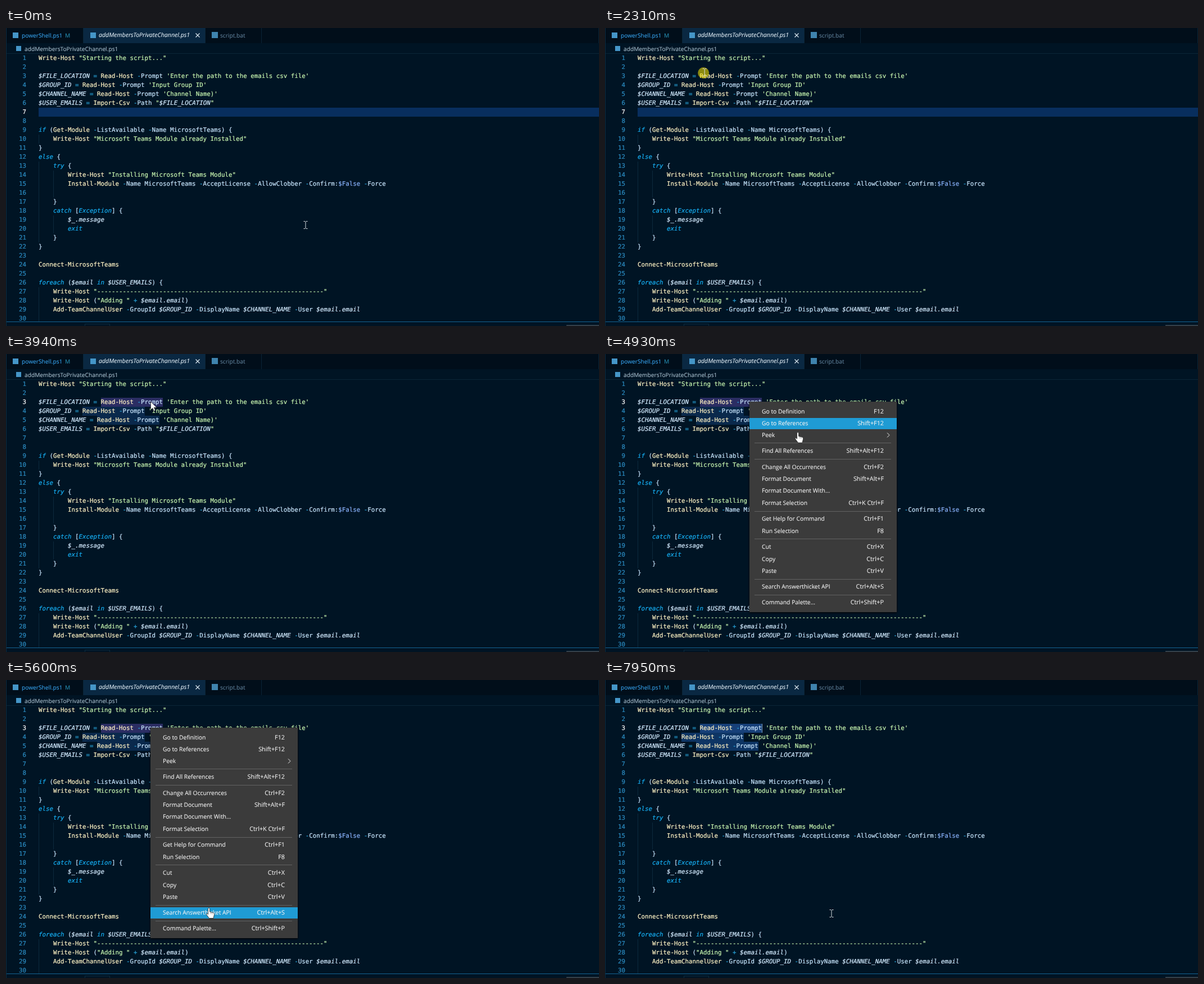
Recreate the animation shown at these times as an HTML page. Size 1055 px wide and 531 px high, loop 8 s.

```html
<!DOCTYPE html>
<html lang="en">
<head>
<meta charset="utf-8">
<title>Script editor</title>
<style>
html, body { margin: 0; width: 100%; height: 100%; overflow: hidden; background: #001424; }
#stage { position: absolute; left: 0; top: 0; width: 1055px; height: 531px; overflow: hidden;
  background: #001424; font: 10.2px/16px "Open Sans", sans-serif; text-rendering: geometricPrecision;
  -webkit-text-stroke: .12px; }
#stage div, #stage svg { position: absolute; white-space: pre; }
.tab { top: 0; height: 27px; background: #010e1a; border-right: 1px solid #0a2436; box-sizing: border-box; }
.icon { background: #4596c8; }
#editor { left: 0; top: 46px; width: 1055px; height: 477px; overflow: hidden;
  font: 10.8px/16px "DejaVu Sans Mono", monospace; color: #c8e5fc; -webkit-text-stroke: .22px; }
#marks, #text, #halo { left: 0; top: 0; }
.num { left: 0; width: 36px; height: 16px; text-align: right; color: #2b8cc2; }
.num.on { color: #fff; }
.code { left: 58px; height: 16px; }
.str { color: #c8f5b0; } .cmd { color: #fff2c4; } .op { color: #28a4da; }
.var { color: #d4ebff; font-style: italic; } .key { color: #16aef2; font-style: italic; }
.const { color: #86aef5; }
.guide { width: 1px; background: #0c2a3d; }
#activeRow { left: 58px; top: 96px; width: 997px; height: 16px; background: #082e5e; }
.mark { height: 16px; background: #0e3564; }
.mark.sel { background: #174079; }
.blur .mark { background: #0a294c; }
.blur .mark.sel { background: #2b2d63; }
#caret { top: 32px; width: 1px; height: 16px; background: #80a4c2; }
#menu { left: 257px; top: 85px; width: 262px; height: 375px; background: #3b3b3b;
  box-shadow: 0 1px 3px #000; color: #f2f2f2; font-size: 10.35px; }
#menu .keys { right: 23px; font-size: 10.8px; }
#menu .sep { left: 9px; width: 243px; height: 1px; background: #626262; }
#hover { left: 0; width: 262px; height: 20px; background: #1f9bd4; }
#halo { width: 20px; height: 20px; border-radius: 50%; background: rgba(255, 235, 0, .55); }
#stage svg { overflow: visible; left: 0; top: 0; width: 1px; height: 1px; }
</style>
</head>
<body>
<div id="stage">
  <div class="tab" style="left:0;width:1055px"></div>
  <div class="tab" style="left:0;width:138px"></div>
  <div class="tab" style="left:138px;width:217px;background:#0a2842"></div>
  <div class="tab" style="left:355px;width:100px"></div>
  <div class="icon" style="left:12px;top:8px;width:10px;height:10px"></div>
  <div style="left:28px;top:5px;color:#36a0ea">powerShell.ps1</div>
  <div style="left:105px;top:5px;color:#268cb0">M</div>
  <div class="icon" style="left:150px;top:8px;width:10px;height:10px"></div>
  <div style="left:165px;top:5px;color:#e3eef6;font-size:10.6px;font-style:italic">addMembersToPrivateChannel.ps1</div>
  <svg><path d="M337.500 9.500l7 7m0-7l-7 7" stroke="#dce8f0" stroke-width="1.200"/></svg>
  <div class="icon" style="left:366px;top:7px;width:11px;height:11px;background:#3f83ad"></div>
  <div style="left:381px;top:5px;color:#5f7e97">script.bat</div>
  <div class="icon" style="left:18px;top:32px;width:9px;height:9px"></div>
  <div style="left:33px;top:29px;color:#a9bfcd">addMembersToPrivateChannel.ps1</div>
  <div style="left:0;top:45px;width:1055px;height:1px;background:#0a2537"></div>

  <div id="editor">
    <div id="activeRow"></div>
    <div id="marks"></div>
    <div id="text"></div>
    <div id="caret"></div>
  </div>

  <div style="left:0;top:523px;width:1055px;height:1px;background:#146393"></div>
  <div style="left:140px;top:527px;width:43px;height:4px;border:1px solid #0d2a3d;border-bottom:0"></div>
  <div style="left:997px;top:529px;width:58px;height:2px;background:#34404a"></div>
  <div style="left:0;top:0;width:1px;height:531px;background:#0d2c40"></div>

  <div id="menu"><div id="hover"></div></div>
  <div id="halo"></div>
  <svg id="beam"><path d="M-3.500-6.500h2.500l1 1 1-1h2.500M0-5.500v11M-3.500 6.500h2.500l1-1 1 1h2.500" fill="none" stroke="#d8dde0"/></svg>
  <svg id="arrow"><path d="M.5 0v14.500l3.400-3.200 2.300 5.200 2.400-1-2.300-5.100h4.700z" fill="#fff" stroke="#222" stroke-width=".7"/></svg>
  <svg id="hand"><path d="M-1.500 1q1.500-2 3 0v6l6 1.500q2.500.8 2 3.500l-1.500 6.500h-7.500l-4.500-6q-1.500-2.500.5-2.500l2 1.500z" fill="#fff" stroke="#222" stroke-width=".8"/><path d="M3.500 8v3M6 8.500v3" stroke="#777" stroke-width=".7"/></svg>
</div>

<script>
const LOOP = 8000, CHAR = 6.5, ROW = 16, LEFT = 58;
const $ = id => document.getElementById(id);
const add = (parent, cls, css, html = "") => {
  const el = document.createElement("div");
  el.className = cls;
  el.style.cssText = css;
  el.innerHTML = html;
  parent.append(el);
  return el;
};

const lines = `Write-Host "Starting the script..."

$FILE_LOCATION = Read-Host -Prompt 'Enter the path to the emails csv file'
$GROUP_ID = Read-Host -Prompt 'Input Group ID'
$CHANNEL_NAME = Read-Host -Prompt 'Channel Name)'
$USER_EMAILS = Import-Csv -Path "$FILE_LOCATION"


if (Get-Module -ListAvailable -Name MicrosoftTeams) {
    Write-Host "Microsoft Teams Module already Installed"
}
else {
    try {
        Write-Host "Installing Microsoft Teams Module"
        Install-Module -Name MicrosoftTeams -AcceptLicense -AllowClobber -Confirm:$False -Force

    }
    catch [Exception] {
        $_.message
        exit
    }
}

Connect-MicrosoftTeams

foreach ($email in $USER_EMAILS) {
    Write-Host "${"-".repeat(62)}"
    Write-Host ("Adding " + $email.email)
    Add-TeamChannelUser -GroupId $GROUP_ID -DisplayName $CHANNEL_NAME -User $email.email
`.split("\n");

const token = /(?<str>"[^"$]*"|'[^']*')|(?<const>\$False)|(?<var>\$[\w.]+)|(?<key>\b(?:if|else|try|catch|exit|foreach|in|Exception)\b)|(?<cmd>[A-Z]\w+-[A-Z]\w+)|(?<op>[-=+])|(?<quote>")/g;
const paint = line => line.replace(token, (text, ...rest) => {
  const groups = rest.at(-1);
  const kind = Object.keys(groups).find(k => groups[k]);
  return `<span class="${kind === "quote" ? "str" : kind}">${text}</span>`;
});

const numbers = lines.map((line, i) => {
  add($("text"), "code", `top:${i * ROW}px`, paint(line));
  return add($("text"), "num", `top:${i * ROW}px`, i + 1);
});

// Indent guides: column, first line, line count
[[0, 10, 1], [0, 13, 9], [4, 14, 3], [4, 19, 2], [0, 27, 4]].forEach(([col, first, count]) =>
  add($("text"), "guide", `left:${LEFT + col * CHAR}px;top:${(first - 1) * ROW}px;height:${count * ROW}px`));

// Menu rows: centre y, label, shortcut
const items = [
  [102.5, "Go to Definition", "F12"], [123.5, "Go to References", "Shift+F12"], [144.5, "Peek", ""],
  [173, "Find All References", "Shift+Alt+F12"], [202, "Change All Occurrences", "Ctrl+F2"],
  [223, "Format Document", "Shift+Alt+F"], [244, "Format Document With...", ""],
  [266, "Format Selection", "Ctrl+K Ctrl+F"], [294, "Get Help for Command", "Ctrl+F1"],
  [316, "Run Selection", "F8"], [344, "Cut", "Ctrl+X"], [366, "Copy", "Ctrl+C"], [387, "Paste", "Ctrl+V"],
  [415, "Search Answerthicket API", "Ctrl+Alt+S"], [443, "Command Palette...", "Ctrl+Shift+P"]
];
const menu = $("menu");
items.forEach(([y, label, keys]) => {
  add(menu, "", `left:22px;top:${y - 93}px`, label);
  add(menu, "keys", `top:${y - 93}px`, keys);
});
[158, 187, 280, 329, 401, 429].forEach(y => add(menu, "sep", `top:${y - 85}px`));
add(menu, "", "left:0;top:0", '<svg><path d="M245 55.500l4 4-4 4" fill="none" stroke="#eee"/></svg>');

// Pointer path: time, x, y, eased
const path = [
  [0, 533, 351], [19.9, 533, 351], [20, 329, 271], [160, 329, 271], [940, 134, 121, 1],
  [970, 134, 121], [1690, 168, 80, 1], [1900, 168, 80], [2030, 171, 80], [2200, 171, 80],
  [2310, 177, 79], [2900, 280, 82], [2980, 282, 81], [3110, 282, 81], [3140, 244, 119],
  [3400, 244, 119], [3880, 257, 85, 1], [4460, 257, 85], [4930, 343, 139], [5250, 358, 335],
  [5280, 358, 337], [5520, 361, 406], [5600, 361, 406], [5770, 363, 413], [6030, 363, 413],
  [6430, 402, 413, 1], [6600, 402, 413], [6680, 402, 417], [6820, 402, 417],
  [7000, 392, 416, 1], [7210, 403, 416, 1], [LOOP, 403, 416]
];
function pointer(t) {
  const i = Math.max(1, path.findIndex(p => p[0] >= t));
  const [t0, x0, y0] = path[i - 1], [t1, x1, y1, eased] = path[i];
  let k = Math.max(0, (t - t0) / (t1 - t0));
  if (eased) k = k * k * (3 - 2 * k);
  return { x: x0 + (x1 - x0) * k, y: y0 + (y1 - y0) * k };
}

const show = (id, on) => $(id).style.display = on ? "" : "none";
const place = (id, x, y) => $(id).style.transform = `translate(${x}px, ${y}px)`;

const SEL_LINE = 2, SEL_COL = 17, SEL_MAX = 17;
let shown = -1;
function drawMarks(length) {
  if (length === shown) return;
  shown = length;
  $("marks").replaceChildren();
  const mark = (row, col, cls) => add($("marks"), "mark " + cls,
    `left:${LEFT + col * CHAR}px;top:${row * ROW}px;width:${length * CHAR}px`);
  const word = lines[SEL_LINE].substr(SEL_COL, length).toLowerCase();
  if (length > 1) lines.forEach((line, row) => {
    const text = line.toLowerCase();
    for (let col = text.indexOf(word); col >= 0; col = text.indexOf(word, col + 1))
      if (row !== SEL_LINE || col !== SEL_COL) mark(row, col, "");
  });
  if (length) mark(SEL_LINE, SEL_COL, "sel");
}

function render(t) {
  const { x, y } = pointer(t);
  const selecting = t >= 2340, blurred = t >= 3850 && t < 7800, open = t >= 4000 && t < 7750;

  show("activeRow", !selecting);
  numbers[6].classList.toggle("on", !selecting);
  numbers[SEL_LINE].classList.toggle("on", selecting);

  const dragX = pointer(Math.min(t - 50, 2980)).x;
  const length = selecting ? Math.max(0, Math.min(SEL_MAX, Math.round((dragX - 168.5) / CHAR))) : 0;
  drawMarks(length);
  $("editor").classList.toggle("blur", blurred);
  show("caret", selecting && !blurred);
  $("caret").style.left = LEFT + (SEL_COL + length) * CHAR + "px";

  show("menu", open);
  const hoverY = pointer(Math.max(0, t - 70)).y;
  const item = items.find(([mid]) => Math.abs(mid - hoverY) <= 10.5);
  show("hover", open && item);
  if (item) $("hover").style.top = Math.round(item[0] - 95) + "px";

  const arrow = t >= 3650 && t < 4460, hand = t >= 4460 && t < 7750;
  show("arrow", arrow);
  show("hand", hand);
  show("beam", !arrow && !hand);
  show("halo", t >= 2200 && t < 2980);
  ["arrow", "hand", "beam"].forEach(id => place(id, x, y));
  place("halo", x - 12, y - 9);
}

const start = performance.now();
function tick() {
  render((performance.now() - start) % LOOP);
  requestAnimationFrame(tick);
}
tick();
</script>
</body>
</html>
```
